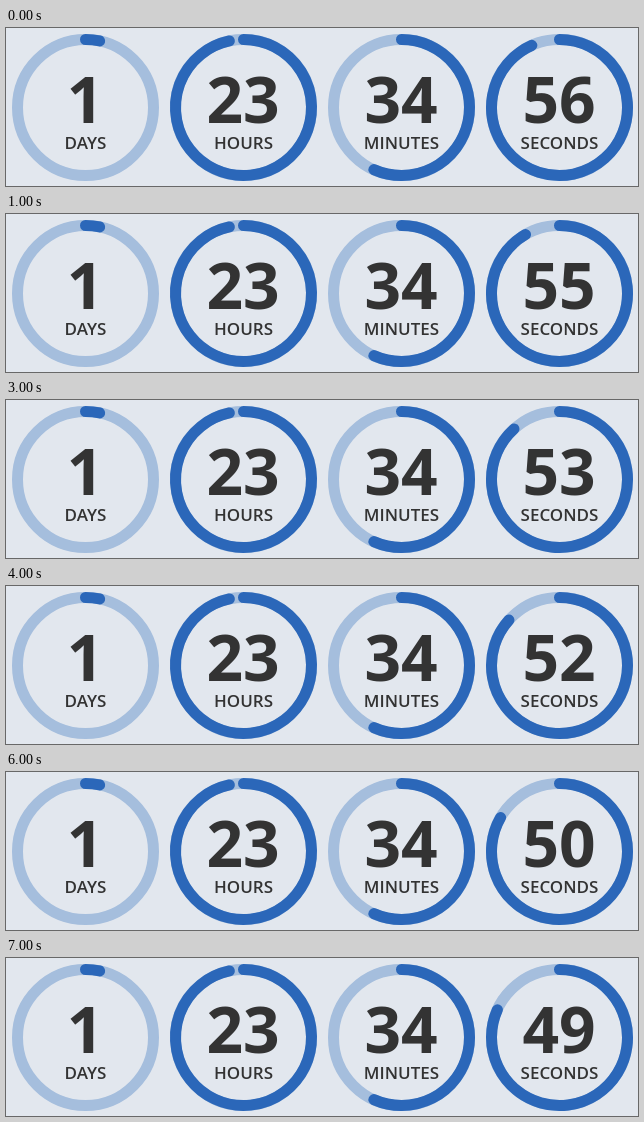
Recreate the animation shown at these times as an HTML page. Size 632 by 158 pixels, loop 8000 ms.

```html
<!DOCTYPE html>
<html lang="en">
<head>
<meta charset="utf-8">
<title>Countdown</title>
<style>
html, body { margin: 0; width: 100%; height: 100%; overflow: hidden; background: #e2e7ee; }
svg { display: block; width: 632px; height: 158px; }
circle, path { fill: none; stroke-width: 11; }
circle { stroke: #a5bedd; }
path { stroke: #2b67b9; stroke-linecap: round; }
text { font-family: "Open Sans", "Noto Sans", sans-serif; text-anchor: middle; fill: #333; }
.num { font-size: 64px; font-weight: 700; }
.label { font-size: 17px; font-weight: 600; }
</style>
</head>
<body>
<svg id="stage" viewBox="0 0 632 158"></svg>
<script>
const NS = "http://www.w3.org/2000/svg";
const stage = document.getElementById("stage");
const R = 68, CY = 79.5, START = 56, LOOP = 8000;

function add(tag, attrs) {
  const el = document.createElementNS(NS, tag);
  for (const k in attrs) el.setAttribute(k, attrs[k]);
  return stage.appendChild(el);
}

// Clockwise arc from the top of the ring
function arc(cx, part) {
  const a = part * 2 * Math.PI;
  const x = cx + R * Math.sin(a), y = CY - R * Math.cos(a);
  return `M${cx} ${CY - R}A${R} ${R} 0 ${part > 0.5 ? 1 : 0} 1 ${x} ${y}`;
}

function dial(index, label) {
  const cx = 79.5 + index * 158;
  add("circle", { cx, cy: CY, r: R });
  const ring = add("path", {});
  const num = add("text", { class: "num", x: cx - 0.5, y: 95 });
  add("text", { class: "label", x: cx, y: 121 }).textContent = label;
  return (value, part) => {
    num.textContent = value;
    ring.setAttribute("d", arc(cx, part));
  };
}

const [days, hours, minutes, seconds] =
  ["DAYS", "HOURS", "MINUTES", "SECONDS"].map((label, i) => dial(i, label));

days(1, 1 / 30);
hours(23, 29 / 30);
minutes(34, 34 / 60);

let shown;
function draw(ms) {
  const s = START - Math.floor((ms % LOOP) / 1000);
  if (s !== shown) seconds(shown = s, s / 60);
}

const t0 = performance.now();
function tick() {
  draw(performance.now() - t0);
  requestAnimationFrame(tick);
}
tick();
</script>
</body>
</html>
```
